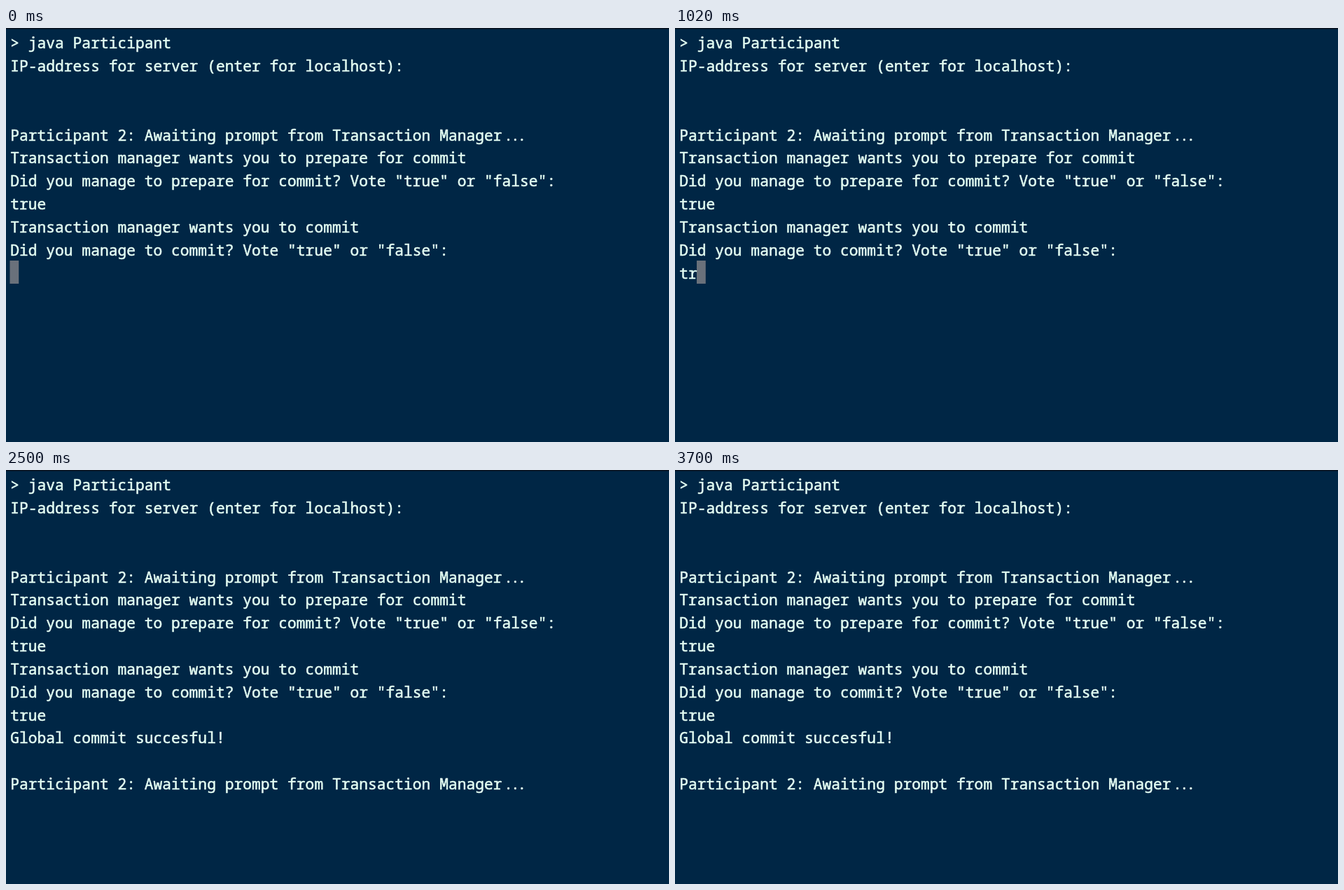
Write an HTML page with a canvas that moves like this. It is 947 by 591 pixels and loops after 3.73 s.

```html
<!DOCTYPE html>
<html lang="en">
<head>
<meta charset="utf-8">
<title>Terminal</title>
<style>
  html, body { margin: 0; height: 100%; overflow: hidden; background: #002645; }
  canvas { display: block; }
</style>
</head>
<body>
<canvas id="stage" width="947" height="591"></canvas>
<script>
const ctx = document.getElementById('stage').getContext('2d');
const LOOP = 3730, LEFT = 6, CELL = 12.77, ROW = 32.83, TOP = 3.6;
const BLINK = 600;
const AWAITING = 'Participant 2: Awaiting prompt from Transaction Manager...';
const INTRO = [
  '> java Participant',
  'IP-address for server (enter for localhost):',
  '', '',
  AWAITING,
  'Transaction manager wants you to prepare for commit',
  'Did you manage to prepare for commit? Vote "true" or "false":',
  'true',
  'Transaction manager wants you to commit',
  'Did you manage to commit? Vote "true" or "false":'
];
const ANSWER = 'true';
const KEY_TIMES = [850, 970, 1090, 1220];
const ENTER = 1650;

// A thin outline gives the glyphs a medium weight.
function drawChar(char, x, y) {
  ctx.fillText(char, x, y);
  ctx.strokeText(char, x, y);
}

function drawLine(text, row) {
  const y = TOP + row * ROW + 25.6;
  const body = text.replace('...', '');
  [...body].forEach((char, i) => drawChar(char, LEFT + 0.2 + i * CELL, y));
  // The ellipsis is set tighter than the character grid.
  if (body !== text) {
    for (let i = 0; i < 3; i++) drawChar('.', LEFT + body.length * CELL + 3 + i * 9.6, y);
  }
}

function draw(time) {
  const entered = time >= ENTER;
  const typed = KEY_TIMES.filter(key => key <= time).length;
  const lines = [...INTRO, ANSWER.slice(0, typed)];
  if (entered) lines.push('Global commit succesful!', '', AWAITING, '');

  ctx.fillStyle = '#002645';
  ctx.fillRect(0, 0, 947, 591);
  ctx.fillStyle = '#08101c';
  ctx.fillRect(0, 0, 947, 1.5);

  // Each key press restarts the blink.
  const reset = entered ? ENTER : typed ? KEY_TIMES[typed - 1] : 0;
  if (Math.floor((time - reset) / BLINK) % 2 === 0) {
    const row = lines.length - 1;
    ctx.fillStyle = '#6a717b';
    ctx.fillRect(LEFT + lines[row].length * CELL - 0.5, Math.round(TOP + row * ROW), 12.75, 33);
  }

  ctx.font = '21.25px "Noto Sans Mono", "DejaVu Sans Mono", monospace';
  ctx.fillStyle = ctx.strokeStyle = '#e4fdf3';
  ctx.lineWidth = 0.55;
  ctx.lineJoin = 'round';
  lines.forEach(drawLine);
}

function tick() {
  draw(performance.now() % LOOP);
  requestAnimationFrame(tick);
}
tick();
</script>
</body>
</html>
```
